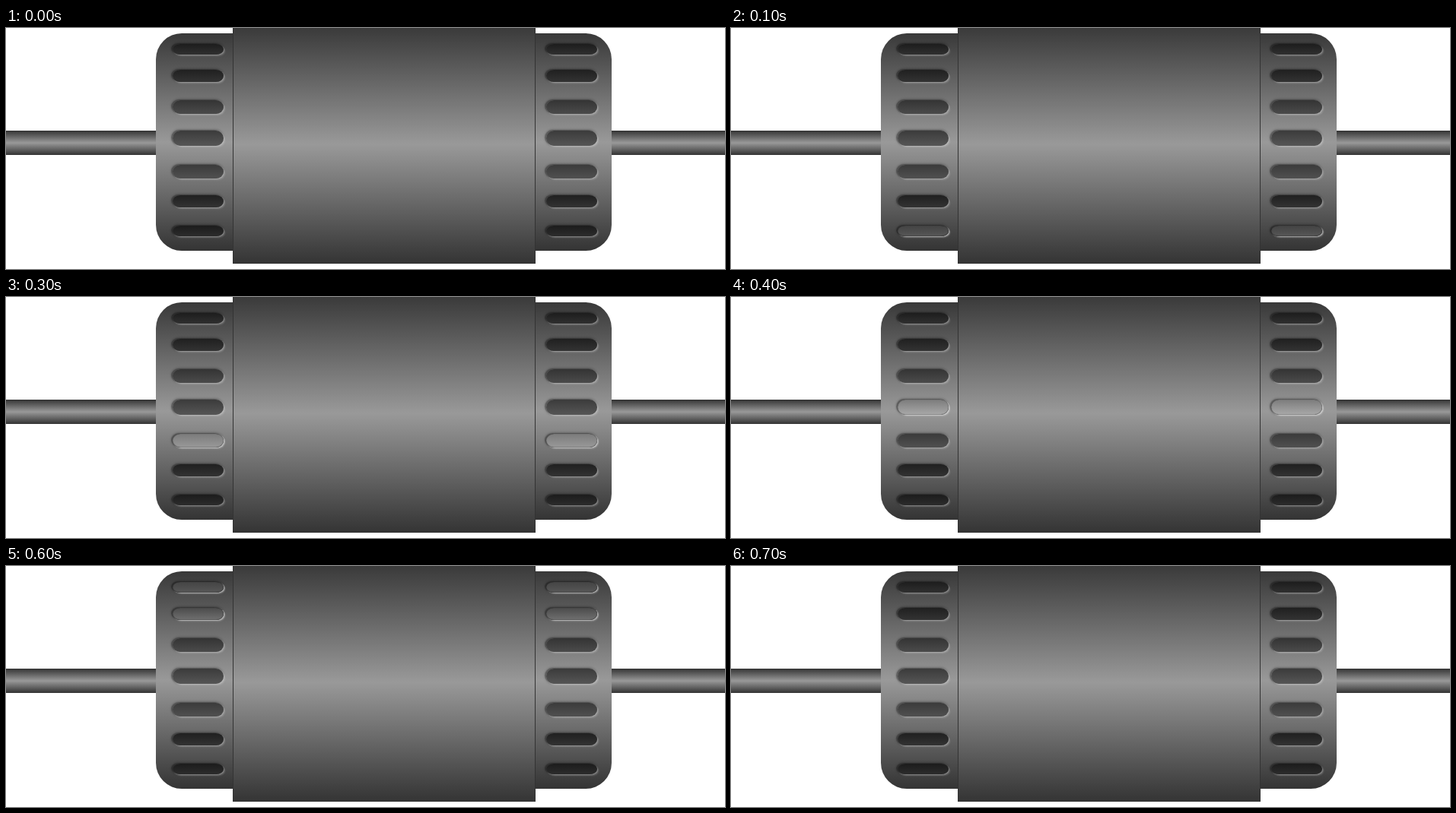
An HTML page that plays this animation: 945 px wide and 317 px high, repeating every 0.8 s.

```html
<!DOCTYPE html>
<html lang="en">
<head>
<meta charset="utf-8">
<title>Rotating drum</title>
<style>
  html, body { margin: 0; width: 100%; height: 100%; overflow: hidden; background: #fff; }
  #stage { position: relative; width: 945px; height: 317px; overflow: hidden; }
  #stage div { position: absolute; box-sizing: border-box; }
  .rod { left: 0; top: 135px; width: 945px; height: 32px;
    background: linear-gradient(#333, #999 50%, #333); }
  .caps { left: 197px; top: 7px; width: 599px; height: 286px; border-radius: 34px;
    background: linear-gradient(#393939, #999 50%, #343434); }
  .drum { left: 298px; top: -1px; width: 398px; height: 311px;
    border: 1px solid #333;
    background: linear-gradient(#3a3a3a, #999 49.5%, #343434) border-box; }
  .slot { width: 67px; }
  .dark { box-shadow:
    1px 1px 1px rgba(255,255,255,.2),
    -2px -1px 1px rgba(0,0,0,.25),
    2px 2px 2px rgba(255,255,255,.2),
    -1px -1px 3px 1px rgba(0,0,0,.2); }
  .lit { opacity: 0; box-shadow:
    inset 0 0 1px rgba(0,0,0,.45),
    inset 0 -1px 0 rgba(0,0,0,.14),
    2px 1px 1px rgba(255,255,255,.28); }
</style>
</head>
<body>
<div id="stage">
  <div class="rod"></div>
  <div class="caps"></div>
  <div class="drum"></div>
</div>
<script>
const LOOP = 800;
const stage = document.getElementById('stage');

// top, height, dark shades, lit shades, time lit
const rows = [
  [21, 14, '#1d1d1d', '#303030', '#444', '#585858', 600],
  [55, 16, '#202020', '#333', '#4b4b4b', '#707070', 600],
  [95, 18, '#343434', '#4b4b4b', '#686868', '#979797', 500],
  [135, 20, '#3b3b3b', '#565656', '#7c7c7c', '#a9a9a9', 400],
  [180, 18, '#3b3b3b', '#505050', '#7b7b7b', '#999', 300],
  [220, 16, '#202020', '#333', '#585858', '#747474', 200],
  [260, 14, '#1c1c1c', '#2c2c2c', '#434343', '#575757', 100]
];

function addSlot(kind, x, y, h, from, to) {
  const el = document.createElement('div');
  el.className = 'slot ' + kind;
  Object.assign(el.style, {
    left: x + 'px', top: y + 'px', height: h + 'px',
    borderRadius: `10px / ${h / 2}px`,
    background: `linear-gradient(${from}, ${to})`
  });
  stage.append(el);
  return el;
}

for (const [y, h, d1, d2, l1, l2, at] of rows) {
  for (const x of [219, 710]) {
    addSlot('dark', x, y, h, d1, d2);
    addSlot('lit', x, y, h, l1, l2).animate([
      { opacity: 0, offset: 0, easing: 'step-end' },
      { opacity: 1, offset: at / LOOP, easing: 'step-end' },
      { opacity: 0, offset: (at + 100) / LOOP, easing: 'step-end' },
      { opacity: 0, offset: 1 }
    ], { duration: LOOP, iterations: Infinity });
  }
}
</script>
</body>
</html>
```
